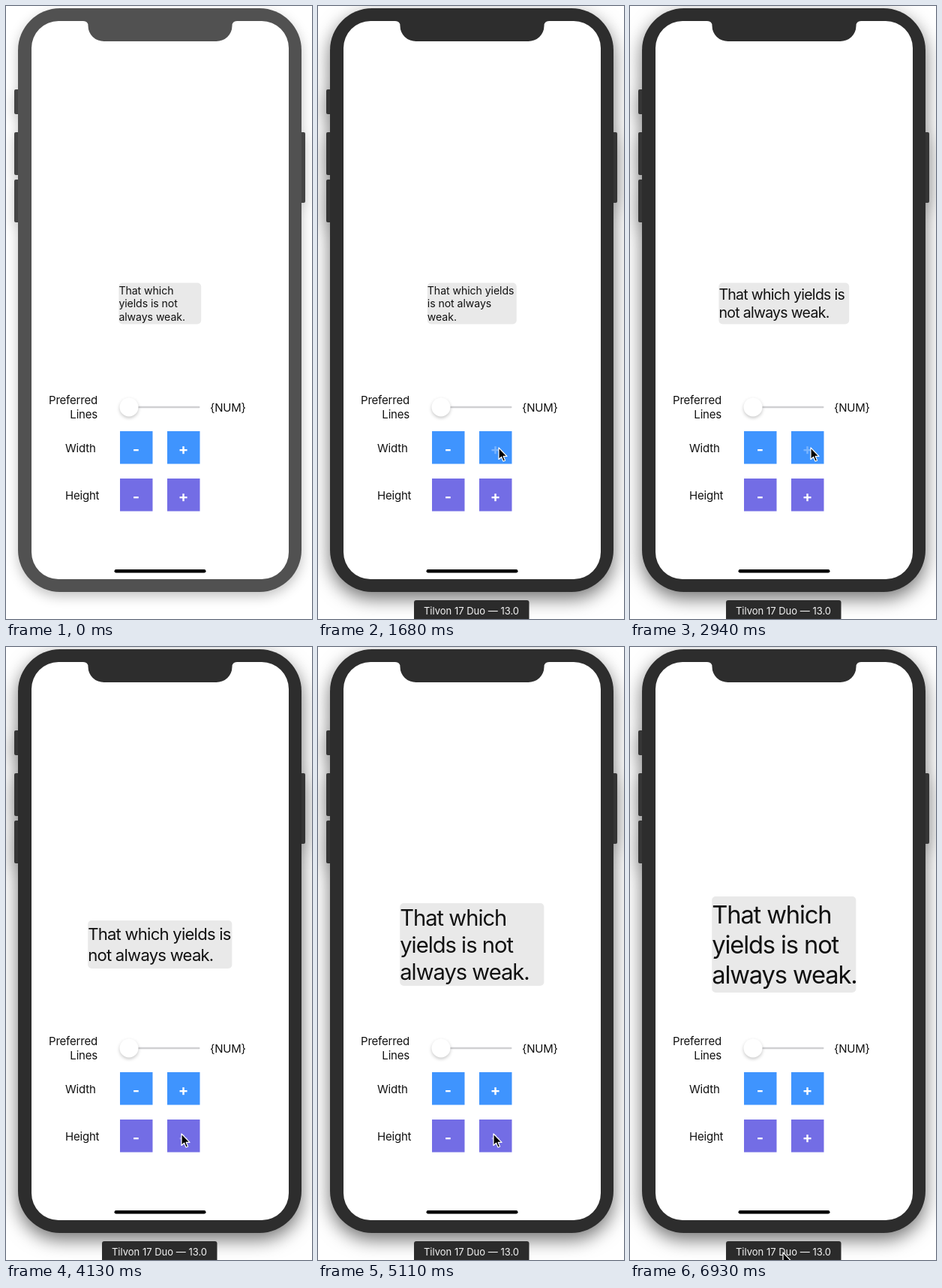
These frames come from a looping animation (408x816 px, 7000 ms). An HTML page:

```html
<!DOCTYPE html>
<html lang="en">
<head>
<meta charset="utf-8">
<title>Label fitting demo</title>
<style>
  html, body { margin: 0; width: 100%; height: 100%; overflow: hidden; background: #fff; }
  svg { display: block; font: 15px Inter, Roboto, sans-serif; font-optical-sizing: none; letter-spacing: -.2px; }
  #phone { --body: #515151; --side: #444; filter: drop-shadow(0 6px 8px rgba(0, 0, 0, .24)); }
  #phone.active { --body: #2d2d2d; --side: #353535; filter: drop-shadow(0 9px 12px rgba(0, 0, 0, .55)); }
  .body { fill: var(--body); }
  .side { fill: var(--side); }
  .knob { filter: drop-shadow(0 2px 2px rgba(0, 0, 0, .22)); }
  .sign { font-size: 20px; font-weight: 700; fill: #fff; text-anchor: middle; letter-spacing: 0; }
</style>
</head>
<body>
<svg width="408" height="816" viewBox="0 0 408 816">
  <g id="phone">
    <g class="side">
      <rect x="11" y="111" width="8" height="33" rx="2"/>
      <rect x="11" y="168" width="8" height="57" rx="2"/>
      <rect x="11" y="231" width="8" height="57" rx="2"/>
      <rect x="391" y="168" width="8" height="94" rx="2"/>
    </g>
    <rect class="body" x="16" y="3" width="378" height="777" rx="56"/>
  </g>
  <path fill="#fff" d="M70 20H103Q109.500 20 109.500 26.500A21 20.500 0 0 0 131 47H280A21 20.500 0 0 0 301.500 26.500Q301.500 20 308 20H341A36 36 0 0 1 377 56V727A36 36 0 0 1 341 763H70A36 36 0 0 1 34 727V56A36 36 0 0 1 70 20Z"/>

  <rect id="box" fill="#e9e9e9" rx="5"/>
  <text id="label" fill="#111"></text>

  <g fill="#111">
    <text x="122" y="530" text-anchor="end">Preferred</text>
    <text x="122" y="548.5" text-anchor="end">Lines</text>
    <text x="272" y="539.5">{NUM}</text>
    <text x="79" y="593.5">Width</text>
    <text x="79" y="656.5">Height</text>
  </g>
  <rect x="152" y="532.800" width="106.500" height="2.400" rx="1.200" fill="#d0d0d2"/>
  <circle class="knob" cx="164" cy="534" r="12.500" fill="#fff"/>

  <g fill="#3f94fe">
    <rect x="152" y="566" width="43.500" height="43.500"/>
    <rect x="215" y="566" width="43.500" height="43.500"/>
  </g>
  <g fill="#736de5">
    <rect x="152" y="629" width="43.500" height="43.500"/>
    <rect x="215" y="629" width="43.500" height="43.500"/>
  </g>
  <g class="sign">
    <text x="173.500" y="596.500">-</text>
    <text x="236.500" y="596.500" id="wider">+</text>
    <text x="173.500" y="659.500">-</text>
    <text x="236.500" y="659.500" id="taller">+</text>
  </g>

  <rect x="144.500" y="750" width="122" height="4.400" rx="2.200" fill="#000"/>
  <g id="tag">
    <rect x="128" y="791" width="153.500" height="30" rx="3" fill="#2b2b2b"/>
    <text x="204.500" y="809.500" font-size="13" letter-spacing="0" text-anchor="middle" fill="#f4f4f4">Tilvon 17 Duo — 13.0</text>
  </g>
  <path id="cursor" d="M0 0V15.500L3.600 12.200L6 18L8.600 17L6.200 11.400H11Z" fill="#000" stroke="#fff" stroke-width="1.200" stroke-linejoin="round"/>
</svg>
<script>
const $ = id => document.getElementById(id);
const clamp = (v, lo, hi) => Math.min(hi, Math.max(lo, v));

const LOOP = 7000, STEP = 70;
const POINT = 0.915, CENTER_X = 205.3, CENTER_Y = 396;
const LINE = 1.193, ASCENT = 0.952, SPACE = 0.25;

// word and its advance in em
const WORDS = [["That", 1.95], ["which", 2.47], ["yields", 2.5], ["is", 0.73],
  ["not", 1.39], ["always", 2.97], ["weak.", 2.43]];

// small sizes are spaced more loosely
const isSmall = size => size < 20;

function wrap(size, width) {
  const em = size * (isSmall(size) ? 1.055 : 1);
  const lines = [];
  let used = Infinity;
  for (const [word, advance] of WORDS) {
    const next = used + (SPACE + advance) * em;
    if (next > width) {
      lines.push(word);
      used = advance * em;
    } else {
      lines[lines.length - 1] += " " + word;
      used = next;
    }
  }
  return lines;
}

// largest whole point size whose wrapped lines fit the box
function fit(width, height) {
  for (let size = 40; size > 8; size--) {
    const lines = wrap(size, width);
    if (lines.length * size * LINE <= height) return { size, lines };
  }
}

function drawLabel(width, height) {
  const { size, lines } = fit(width, height);
  const w = width * POINT, h = height * POINT, px = size * POINT;
  const x = CENTER_X - w / 2;
  const top = CENTER_Y - lines.length * px * LINE / 2;
  const box = { x, y: CENTER_Y - h / 2, width: w, height: h };
  for (const key in box) $("box").setAttribute(key, box[key]);
  $("label").style.fontSize = px * 0.966 + "px";
  $("label").style.letterSpacing = px * (isSmall(size) ? -0.005 : -0.0335) + "px";
  $("label").innerHTML = lines.map((line, i) =>
    `<tspan x="${x}" y="${top + px * (ASCENT + i * LINE)}">${line}</tspan>`).join("");
}

// repeated taps: how many so far, and how the sign fades back
function taps(t, start, gap, count) {
  const n = clamp(Math.floor((t - start) / gap) + 1, 0, count);
  const since = t - start - (n - 1) * gap;
  return { n, opacity: n ? 0.3 + 0.7 * clamp((since - 140) / 110, 0, 1) : 1 };
}

// time, x, y
const PATH = [[420, 211, 816], [980, 243, 575], [1120, 241, 588], [3430, 241, 588],
  [3640, 225, 643], [3850, 234, 648], [6510, 234, 648], [6930, 204, 806]];

function cursorAt(t) {
  const i = clamp(PATH.findIndex(p => p[0] > t), 1, PATH.length - 1);
  const [t0, x0, y0] = PATH[i - 1], [t1, x1, y1] = PATH[i];
  const k = (1 - Math.cos(Math.PI * clamp((t - t0) / (t1 - t0), 0, 1))) / 2;
  return [x0 + (x1 - x0) * k, y0 + (y1 - y0) * k];
}

function draw(now) {
  const t = Math.floor(now % LOOP / STEP) * STEP;
  const wide = taps(t, 1610, 200, 9), tall = taps(t, 4130, 175, 8);
  drawLabel(120 + 10 * wide.n, 60 + 10 * tall.n);
  $("wider").style.opacity = wide.opacity;
  $("taller").style.opacity = tall.opacity;
  $("phone").classList.toggle("active", t >= 1400);

  const hovering = t >= 490;
  $("tag").style.display = $("cursor").style.display = hovering ? "" : "none";
  // past the last point the cursor rests there
  const [x, y] = t >= 6930 ? PATH[PATH.length - 1].slice(1) : cursorAt(t);
  $("cursor").setAttribute("transform", `translate(${x} ${y})`);
}

const begin = performance.now();
function tick() {
  draw(performance.now() - begin);
  requestAnimationFrame(tick);
}
tick();
</script>
</body>
</html>
```
